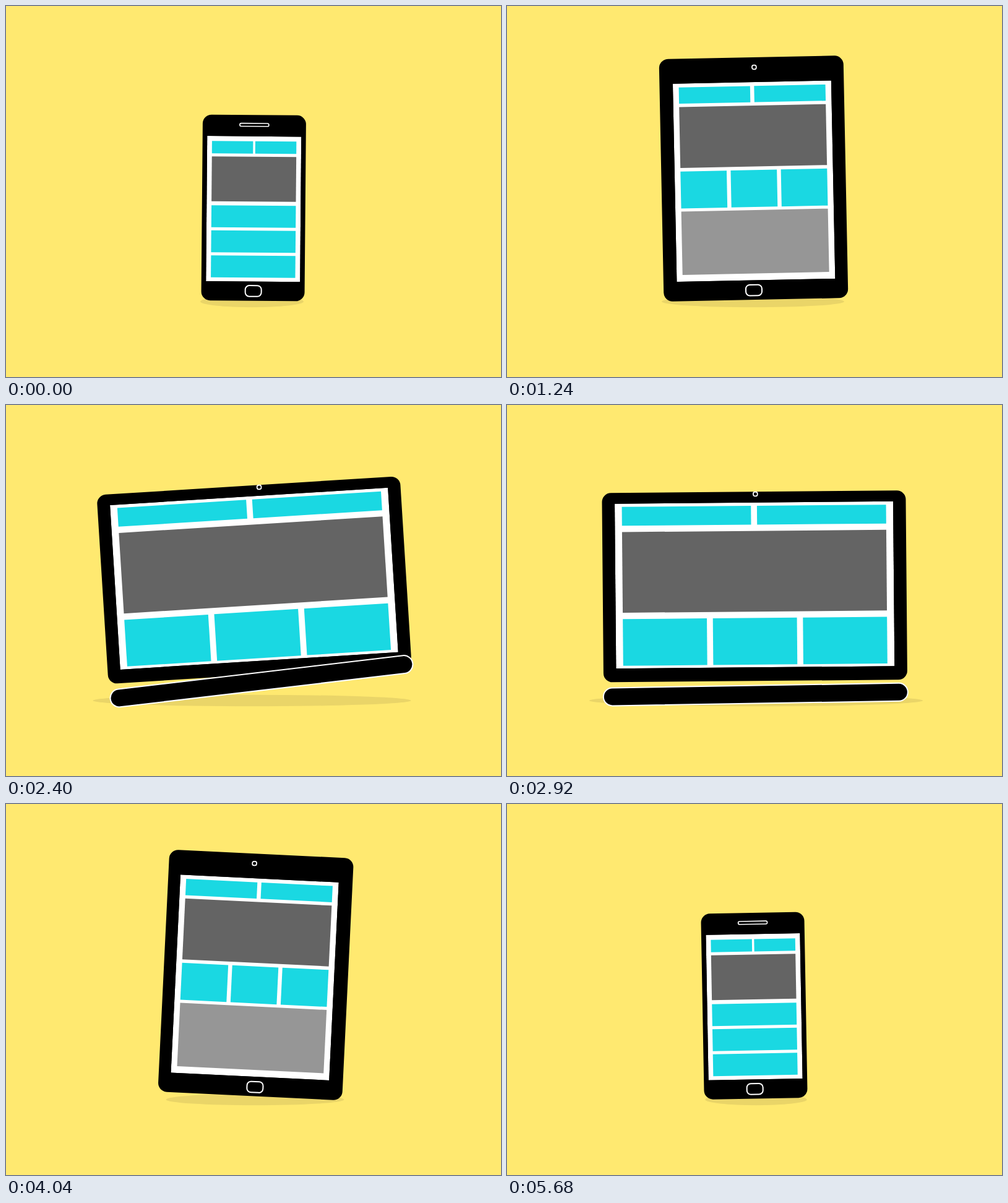
An HTML page that plays this animation: 800 by 600 pixels, repeating every 6 s.

```html
<!DOCTYPE html>
<html lang="en">
<head>
<meta charset="utf-8">
<title>Responsive devices</title>
<style>
  html, body { margin: 0; width: 100%; height: 100%; overflow: hidden; background: #ffe970; }
  svg { display: block; }
  #stage { width: 100vw; height: 100vh; }
</style>
</head>
<body>
<svg id="stage" viewBox="0 0 800 600">
  <rect width="800" height="600" fill="#ffe970"/>
  <ellipse id="shadow" cy="478" ry="9.3" fill="#ead568"/>
  <g id="device">
    <rect id="body" rx="14.5"/>
    <svg id="screen" overflow="hidden">
      <rect width="100%" height="100%" fill="#fff"/>
      <g id="page"></g>
    </svg>
    <rect id="cam" stroke="#fff"/>
  </g>
  <rect id="base" stroke="#fff" stroke-width="2"/>
</svg>
<script>
const $ = id => document.getElementById(id);
const LOOP = 6000, LAST = 5680, STEP = 40;
const CYAN = '#1ad8e2', DARK = '#646464', LIGHT = '#969696';

// device size, screen, page layout (stack: 1 = rows, 0 = columns) and how far each device type is reached
const phone = {
  w: 167, h: 300.5, sw: 152, sh: 235, top: 34.5, floor: 477, tab: 0, lap: 0,
  margin: 7.8, gap: 3.5, rowY: 8, rowH: 20, heroY: 33, heroH: 72.5,
  cellY: 112, cellH: 35.5, stack: 1, footY: 245, anchor: 120
};
const tablet = {
  w: 298, h: 392, sw: 256, sh: 320.5, top: 40, floor: 477, tab: 1, lap: 0,
  margin: 9.5, gap: 6.5, rowY: 6.3, rowH: 26.3, heroY: 38, heroH: 98.5,
  cellY: 142.2, cellH: 59.8, stack: 0, footY: 207, anchor: 193
};
const laptop = {
  w: 491, h: 306, sw: 450, sh: 266.5, top: 17.5, floor: 448, tab: 1, lap: 1,
  margin: 11.5, gap: 9.7, rowY: 5.2, rowH: 30.5, heroY: 45.8, heroH: 130.5,
  cellY: 186.6, cellH: 75.5, stack: 0, footY: 275, anchor: 86
};

// dir -1 plays the same turn mirrored and in reverse
const TURNS = [
  { mid: 722, dir: 1, small: phone, big: tablet },
  { mid: 1952, dir: 1, small: tablet, big: laptop },
  { mid: 3603, dir: -1, small: tablet, big: laptop },
  { mid: 5087, dir: -1, small: phone, big: tablet }
];

const lerp = (a, b, k) => a + (b - a) * k;
const clamp = (v, lo, hi) => Math.min(hi, Math.max(lo, v));
const ramp = (u, a, b) => { const k = clamp((u - a) / (b - a), 0, 1); return k * k * (3 - 2 * k); };

// rocking that swells before a turn and dies away after it
function rock(u) {
  const size = u < 0 ? 45.5 * Math.exp(u / 219) : 70.6 * Math.exp(-u / 160);
  return Math.min(31, size) * Math.sin(Math.PI * (u - 235) / 162);
}

// width and layout change first, height follows
function shape(turn, u) {
  const k = ramp(u, -80, 110), late = ramp(u, 45, 205), s = {};
  for (const key in turn.small)
    s[key] = lerp(turn.small[key], turn.big[key], key === 'h' || key === 'sh' ? late : k);
  s.stretch = 1 + 1.41 * (1 + Math.cos(Math.PI * Math.min(1, Math.abs(u) / 228)));
  s.grow = turn.big === laptop ? ramp(u, -20, 300) : 0;
  return s;
}

function set(el, attrs) {
  for (const k in attrs) el.setAttribute(k, attrs[k]);
}
const box = (el, x, y, width, height) => set(el, { x, y, width, height });

const blocks = [CYAN, CYAN, DARK, CYAN, CYAN, CYAN, LIGHT].map(fill => {
  const r = document.createElementNS('http://www.w3.org/2000/svg', 'rect');
  r.setAttribute('fill', fill);
  return $('page').appendChild(r);
});

function drawPage(s) {
  const { margin: m, gap, stack } = s;
  const full = s.sw - 2 * m, half = (full - gap) / 2, third = (full - 2 * gap) / 3;
  box(blocks[0], m, s.rowY, half, s.rowH);
  box(blocks[1], m + half + gap, s.rowY, half, s.rowH);
  box(blocks[2], m, s.heroY, full, s.heroH);
  for (let i = 0; i < 3; i++)
    box(blocks[3 + i], m + i * (1 - stack) * (third + gap), s.cellY + i * stack * 40.5,
        lerp(third, full, stack), s.cellH);
  box(blocks[6], m, s.footY, full, 102.5);
  set($('page'), { transform: `translate(0 ${s.anchor * (1 - s.stretch)}) scale(1 ${s.stretch})` });
}

// stage position of a point given from the bottom centre of a box tilted on its corner
function place(corner, side, w, deg, x, y) {
  const a = deg * Math.PI / 180, dx = x - side * w / 2;
  return [corner[0] + dx * Math.cos(a) - y * Math.sin(a),
          corner[1] + dx * Math.sin(a) + y * Math.cos(a)];
}

function draw(time) {
  const t = Math.min(LAST, Math.floor(time / STEP) * STEP);
  const near = TURNS.reduce((a, b) => Math.abs(t - b.mid) < Math.abs(t - a.mid) ? b : a);
  const s = shape(near, near.dir * (t - near.mid));
  const { w, h, sw, sh, tab, lap, grow } = s;
  const tilt = TURNS.reduce((sum, n) => sum + n.dir * rock(n.dir * (t - n.mid)), 0);
  const lean = Math.abs(tilt), side = tilt < 0 ? -1 : 1;

  // the body rocks on its lower corner
  const corner = [
    400 + side * (w / 2 - lean * (2.15 + .95 * lap)),
    s.floor + Math.min(5.5 + 5 * lap, lean * .88)
  ];
  set($('device'), { transform: `translate(${corner}) rotate(${tilt}) translate(${-side * w / 2} 0)` });
  box($('body'), -w / 2, -h, w, h);
  box($('screen'), -sw / 2 - .5 * tilt * tab * (1 - lap), s.top - h, sw, sh);
  drawPage(s);

  const cw = lerp(47, 6.8, tab), ch = lerp(4.8, 6.6, tab);
  const camX = -tilt * (3.9 + .95 * lap) * tab, camY = lerp(16, 3.7, lap) - h;
  box($('cam'), camX - cw / 2, camY - ch / 2, cw, ch);
  set($('cam'), { rx: lerp(2.4, 2.8, tab), 'stroke-width': lerp(1.6, 1.8, tab) });

  // home button, which grows into the keyboard base
  const bw = lerp(26, 492, grow), bh = lerp(17.6, 29, grow);
  const swing = clamp(tilt * 1.88, -24, 24), roll = Math.abs(swing);
  const foot = [400 + side * (bw / 2 - roll * (2.2 + .033 * roll)), 485.6 + .58 * roll];
  const home = place(corner, side, w, tilt, tilt * lerp(1.2, 2.7, tab), -16 + Math.min(7.6, lean * .42));
  const bar = place(foot, side, bw, swing, 0, -14);
  const x = lerp(home[0], bar[0], lap), y = lerp(home[1], bar[1], lap);
  box($('base'), -bw / 2, -bh / 2, bw, bh);
  set($('base'), {
    rx: lerp(6.5, 14.5, Math.min(1, grow * 1.3)),
    transform: `translate(${x} ${y}) rotate(${lerp(tilt, swing, lap)})`
  });

  const spread = w + 2 + 50 * lap - 4.3 * lerp(lean, roll, lap);
  set($('shadow'), { cx: 400 - 2.5 * near.dir, rx: Math.max(20, spread / 2) });
}

const start = performance.now();
function tick() {
  draw((performance.now() - start) % LOOP);
  requestAnimationFrame(tick);
}
tick();
</script>
</body>
</html>
```
